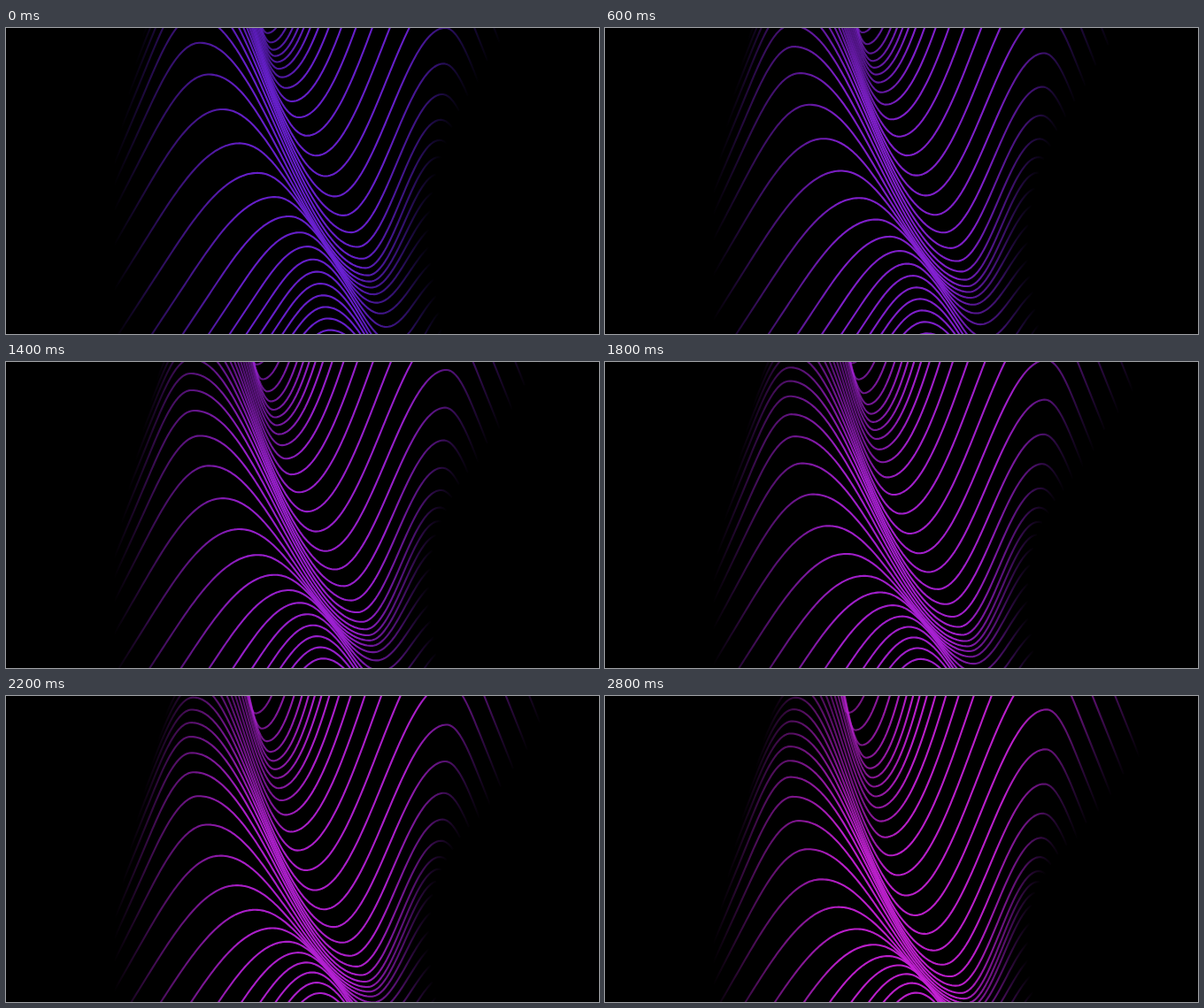
These frames come from a looping animation (670 by 346 pixels, 2900 ms). An HTML page with a canvas:

```html
<!DOCTYPE html>
<html lang="en">
<head>
<meta charset="utf-8">
<title>Wave lines</title>
<style>
  html, body { margin: 0; width: 100%; height: 100%; overflow: hidden; background: #000; }
  canvas { display: block; }
</style>
</head>
<body>
<canvas id="stage" width="670" height="346"></canvas>
<script>
const ctx = document.getElementById('stage').getContext('2d');
const LOOP = 2900, STEP = 100, SPAN = 2800;
const LINES_PER_SPAN = 4;

const clamp = (v, lo, hi) => Math.min(hi, Math.max(lo, v));
const bell = (v, center, width) => Math.exp(-(((v - center) / width) ** 2));
const arc = s => 4 * s * (1 - s);

// Turning points of a line: `u` is its phase, `s` the progress of the loop.
function leftCrest(u, s) {
  const drift = 93 - 38 * Math.tanh((u - 2.7) / 4);
  return {
    x: 263 + 70 * Math.tanh((u - 1.4) / 3.6) + 2.3 * Math.hypot(u + 1, 3),
    y: 86.6 + 13 * u + 86 * Math.tanh((u + 0.2) / 3.2) + drift * s + 4.5 * arc(s)
  };
}

function trough(u, s) {
  const v = u + 6;
  const swing = Math.sin(2 * Math.PI * (v + 1.3) / 17);
  const drift = 62 + 42 * bell(v, -2.5, 6);
  return {
    x: 366 + 6.3 * v + 12 * swing,
    y: 180 + 15 * v + 22.5 * swing + drift * s - 4.5 * arc(s)
  };
}

function rightCrest(u, s) {
  const lift = Math.max(0, -u - 1.8);
  const drift = Math.max(50, 57 - 7.1 * u);
  return {
    x: 489 + 15 * Math.tanh(u / 7) ** 2,
    y: 165 + 19 * u - 2.9 * lift * lift + drift * s + 2 * arc(s)
  };
}

function between(a, b, x, skew) {
  const f = Math.pow((x - a.x) / (b.x - a.x), skew);
  return a.y + (b.y - a.y) * (1 - Math.cos(Math.PI * f)) / 2;
}

// Drop from a crest that bends over `bend` pixels and then runs straight.
function fall(dist, slope, bend) {
  const r = 2 * bend / Math.PI;
  return dist < bend
    ? slope * r * (1 - Math.cos(dist / r))
    : slope * (r + dist - bend);
}

// Horizontal extent of a line and its stroke, fading out at both ends.
function lineStyle(u, s) {
  const from = 122 + clamp(-u - 3, 0, 10) * 8;
  const w = clamp(4 - u, 0, 15);
  const to = 478 + 0.56 * w * w + 3 * Math.max(0, u - 4);
  const red = 107 + 88 * Math.pow(s, 0.8);
  const grad = ctx.createLinearGradient(from, 0, to, 0);
  const stop = (x, tint, alpha) => grad.addColorStop(
    (x - from) / (to - from), `rgba(${Math.round(red * tint)},32,212,${alpha})`);
  stop(from, 0.9, 0);
  stop(from + 50, 0.95, 0.42);
  stop(from + 145, 1, 0.95);
  stop(to - 95, 1, 0.95);
  stop(to - 36, 0.9, 0.5);
  stop(to, 0.75, 0);
  return { from, to, grad };
}

function drawLine(u, s) {
  const a = leftCrest(u, s), b = trough(u, s), c = rightCrest(u, s);
  const bend = 45 + 62 * bell(u, 1.8, 3.5);
  const slope = 1.5 + 1 / (1 + Math.exp(u + 1.2));
  const { from, to, grad } = lineStyle(u, s);
  ctx.beginPath();
  for (let x = from; x <= to; x += 2) {
    const y = x < a.x ? a.y + fall(a.x - x, slope, bend)
      : x < b.x ? between(a, b, x, 1.04)
      : x < c.x ? between(b, c, x, 1)
      : c.y + fall(x - c.x, 2.5, 36);
    ctx.lineTo(x, y);
  }
  ctx.strokeStyle = grad;
  ctx.stroke();
}

function draw(elapsed) {
  const t = Math.floor((elapsed % LOOP) / STEP) * STEP;
  const s = t / SPAN;
  ctx.fillStyle = '#000';
  ctx.fillRect(0, 0, 670, 346);
  ctx.lineWidth = 2.1;
  ctx.lineJoin = 'round';
  for (let k = -19; k <= 16; k++) drawLine(k - LINES_PER_SPAN * s, s);
}

const start = performance.now();
function tick() {
  draw(performance.now() - start);
  requestAnimationFrame(tick);
}
tick();
</script>
</body>
</html>
```
